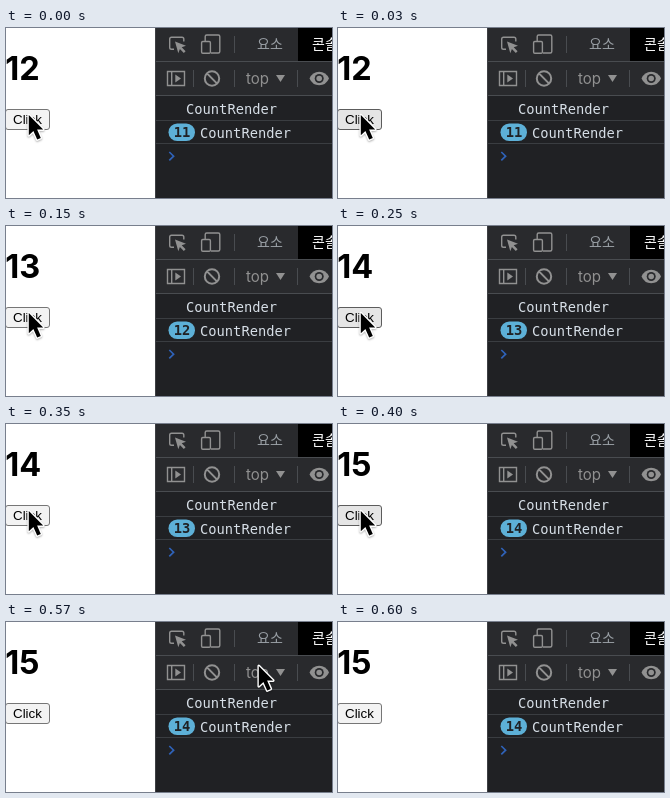
An HTML page with a canvas that plays this animation: 326x170 px, repeating every 1060 ms.

```html
<!DOCTYPE html>
<html lang="ko">
<head>
<meta charset="utf-8">
<title>Click counter</title>
<style>
  html, body { margin: 0; width: 100%; height: 100%; overflow: hidden; background: #fff; }
  canvas { display: block; width: 326px; height: 170px; }
</style>
</head>
<body>
<canvas id="stage"></canvas>
<script>
const W = 326, H = 170, LOOP = 1060;
const canvas = document.getElementById('stage');
const ctx = canvas.getContext('2d');
const dpr = window.devicePixelRatio || 1;
canvas.width = W * dpr;
canvas.height = H * dpr;
ctx.scale(dpr, dpr);

const UI = 'Inter, "Noto Sans CJK KR", "Noto Sans CJK", sans-serif';
const MONO = '"DejaVu Sans Mono", monospace';
const HANGUL = '"Noto Sans CJK KR", "Noto Sans CJK", sans-serif';
const ICON = '#919191';
const LINE = '#494c50';
const onButton = [22, 86];

// Each state holds from its start time until the next one.
const states = [
  { at: 0, count: 12, logs: 11, cursor: onButton },
  { at: 30, count: 12, logs: 11, pressed: true, cursor: onButton },
  { at: 80, count: 13, logs: 11, pressed: true, cursor: onButton },
  { at: 100, count: 13, logs: 12, pressed: true, cursor: onButton },
  { at: 150, count: 13, logs: 12, cursor: onButton },
  { at: 250, count: 14, logs: 13, pressed: true, cursor: onButton },
  { at: 350, count: 14, logs: 13, cursor: onButton },
  { at: 400, count: 15, logs: 14, pressed: true, cursor: onButton },
  { at: 550, count: 15, logs: 14, cursor: [170, 65] },
  { at: 570, count: 15, logs: 14, cursor: [252, 43] },
  { at: 600, count: 15, logs: 14 }
];

function rect(x, y, w, h, color) {
  ctx.fillStyle = color;
  ctx.fillRect(x, y, w, h);
}

function text(str, x, y, font, color, align = 'left') {
  ctx.font = font;
  ctx.fillStyle = color;
  ctx.textAlign = align;
  ctx.fillText(str, x, y);
}

function stroke(d, color = ICON, width = 1.4) {
  ctx.strokeStyle = color;
  ctx.lineWidth = width;
  ctx.stroke(new Path2D(d));
}

function fill(d, color = ICON) {
  ctx.fillStyle = color;
  ctx.fill(new Path2D(d));
}

function disc(x, y, r, color) {
  ctx.beginPath();
  ctx.arc(x, y, r, 0, 2 * Math.PI);
  ctx.fillStyle = color;
  ctx.fill();
}

function roundRect(x, y, w, h, r, color, border) {
  ctx.beginPath();
  ctx.roundRect(x, y, w, h, r);
  ctx.fillStyle = color;
  ctx.fill();
  if (border) {
    ctx.strokeStyle = border;
    ctx.lineWidth = 1;
    ctx.stroke();
  }
}

function drawPage(s) {
  rect(0, 0, 149, H, '#fff');
  text(s.count, -0.8, 52, `bold 32.5px ${UI}`, '#000');
  roundRect(-0.5, 81.5, 44, 20, 2.5, s.pressed ? '#e5e5e5' : '#f3f3f3', s.pressed ? '#5c5c5c' : '#767676');
  text('Click', 7, 96, '13.33px "Liberation Sans", Arial, sans-serif', '#000');
}

function drawTabs() {
  rect(149, 0, 177, 67, '#292a2d');
  rect(292, 0, 34, 33, '#000');
  rect(149, 33, 177, 1, LINE);
  rect(149, 67, 177, 1, LINE);
  rect(228, 8, 1, 17, LINE);

  // element picker
  stroke('M168 21.3H165.5Q163.7 21.3 163.7 19.5V11Q163.7 9.2 165.5 9.2H176Q177.8 9.2 177.8 11V13.5');
  fill('M169 13.5L180 17.8L175.7 19.3L179.6 23.2L177.8 25L173.9 21.1L172.3 25.2Z');

  // device toggle
  stroke('M199.2 13V8.5Q199.2 7 200.7 7H212.3Q213.8 7 213.8 8.5V23.5Q213.8 25 212.3 25H205');
  stroke('M196.8 13.5H203.2Q204.4 13.5 204.4 14.7V24Q204.4 25.2 203.2 25.2H196.8Q195.6 25.2 195.6 24V14.7Q195.6 13.5 196.8 13.5Z');

  text('요소', 251, 20.5, `14px ${HANGUL}`, '#9aa0a6');
  text('콘솔', 306, 20.5, `500 14px ${HANGUL}`, '#fff');
}

function drawToolbar() {
  for (const x of [187, 228, 291]) rect(x, 42, 1, 17, LINE);

  // sidebar toggle
  stroke('M161.5 43.5H178.5V57.5H161.5ZM165.7 43.5V57.5');
  fill('M169.3 46.5V54.5L175 50.5Z');

  // clear console
  stroke('M213.2 50.5A7.2 7.2 0 1 1 198.8 50.5A7.2 7.2 0 1 1 213.2 50.5ZM201 45.4L211.1 55.6', ICON, 2);

  text('top', 240, 56, `15px ${UI}`, ICON);
  fill('M270 47H279L274.5 54Z');

  // eye
  fill('M303.5 50.5Q306.5 43.8 313.2 43.8T323 50.5Q320 57.2 313.2 57.2T303.5 50.5Z');
  disc(313.2, 50.5, 4.5, '#292a2d');
  disc(313.2, 50.5, 2.8, ICON);
}

function drawConsole(s) {
  const mono = `13.75px ${MONO}`;
  rect(149, 68, 177, H - 68, '#202124');
  rect(149, 92, 177, 1, '#3a3d41');
  rect(149, 115, 177, 1, '#3a3d41');
  text('CountRender', 180, 86, mono, '#d6dee6');
  text('CountRender', 194, 110, mono, '#d6dee6');
  roundRect(162.5, 95.5, 26.5, 17.5, 8.75, '#5db0d7');
  text(s.logs, 176, 109, `bold ${mono}`, '#202124', 'center');
  stroke('M163.3 124L167.6 128.2L163.3 132.4', '#2f62b8', 1.7);
}

function drawCursor([x, y]) {
  const arrow = new Path2D('M0 0V20.4L4.6 16L8.4 24.6L12 23L8.3 14.6H14.4Z');
  ctx.save();
  ctx.translate(x + 0.8, y + 0.9);
  ctx.lineJoin = 'round';
  ctx.lineWidth = 2.8;
  ctx.strokeStyle = '#fff';
  ctx.shadowColor = 'rgba(0,0,0,.3)';
  ctx.shadowBlur = 2 * dpr;
  ctx.shadowOffsetY = dpr;
  ctx.stroke(arrow);
  ctx.shadowColor = 'transparent';
  ctx.fillStyle = '#000';
  ctx.fill(arrow);
  ctx.restore();
}

function draw(now) {
  const t = now % LOOP;
  const s = states.findLast(state => state.at <= t) || states[0];
  drawPage(s);
  drawTabs();
  drawToolbar();
  drawConsole(s);
  rect(149, 0, 1, H, '#3d3f43');
  if (s.cursor) drawCursor(s.cursor);
}

const start = performance.now();
function tick() {
  draw(performance.now() - start);
  requestAnimationFrame(tick);
}
tick();
</script>
</body>
</html>
```
